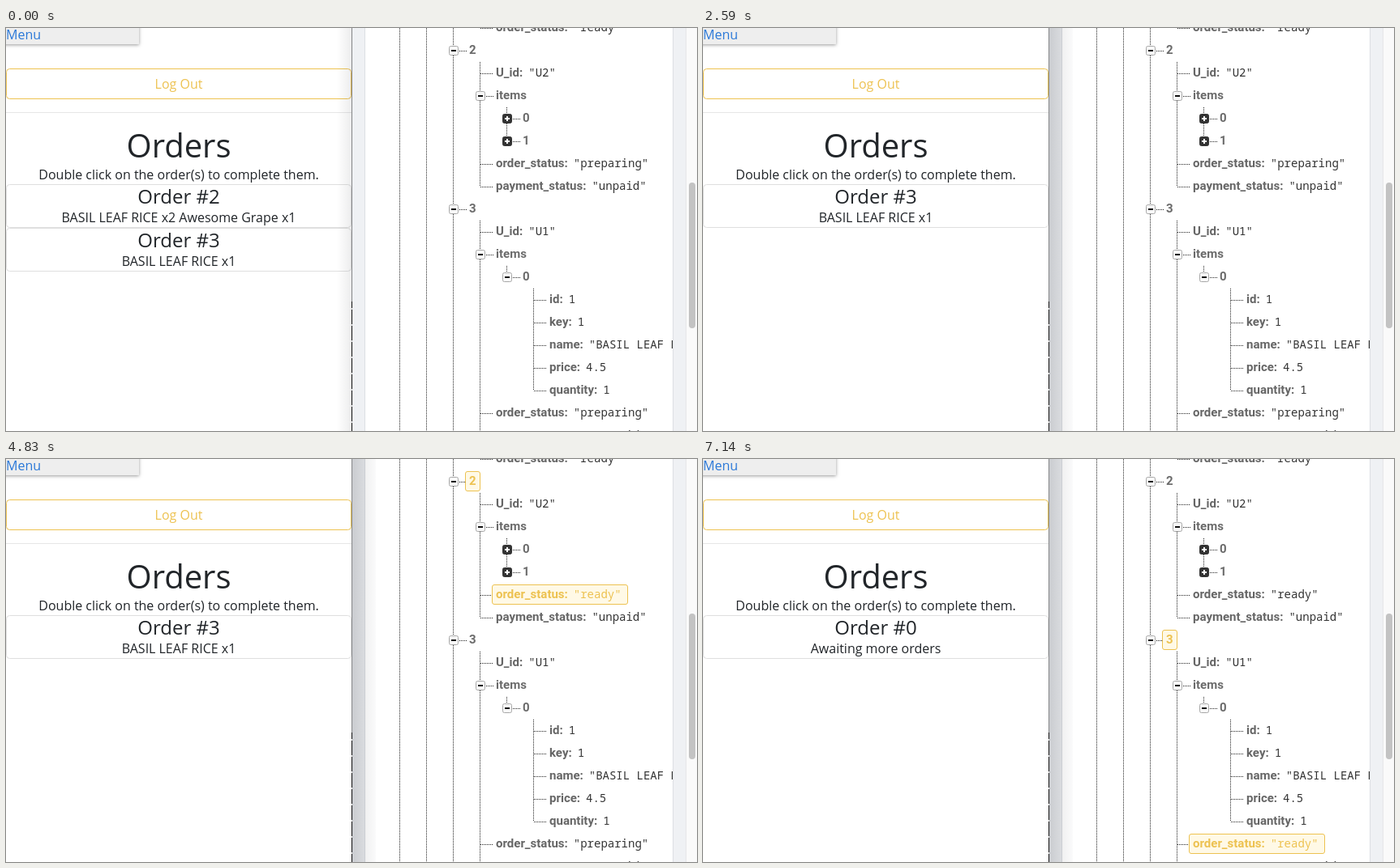
An HTML page with a canvas for the animation above (7280 ms loop, 852x498 px).

```html
<!DOCTYPE html>
<html lang="en">
<head>
<meta charset="utf-8">
<title>Orders</title>
<style>
html, body { margin: 0; width: 100%; height: 100%; overflow: hidden; background: #fff; }
canvas { display: block; }
</style>
</head>
<body>
<canvas id="stage" width="852" height="498"></canvas>
<script>
const ctx = document.getElementById('stage').getContext('2d');
const LOOP = 7280, W = 852, H = 498, SPLIT = 427;
const SANS = '"Open Sans", sans-serif';
const KEY = 'bold 15px Roboto, sans-serif';
const MONO = '14px "Roboto Mono", "Noto Sans Mono", monospace';
const GOLD = '#edc251';

// Moments of the hard changes, in ms
const FOCUS = 1610;
const DONE_2 = 2590, SAVED_2 = 2940, CALM_2 = 4970;
const DONE_3 = 5180, SAVED_3 = 5530;

function rect(x, y, w, h, color) {
  ctx.fillStyle = color;
  ctx.fillRect(x, y, w, h);
}

function text(str, x, y, font, color, align = 'left') {
  ctx.font = font;
  ctx.fillStyle = color;
  ctx.textAlign = align;
  ctx.fillText(str, x, y);
}

function frame(x, y, w, h, r, stroke, fill) {
  ctx.beginPath();
  ctx.roundRect(x + 0.5, y + 0.5, w - 1, h - 1, r);
  if (fill) { ctx.fillStyle = fill; ctx.fill(); }
  ctx.strokeStyle = stroke;
  ctx.lineWidth = 1;
  ctx.stroke();
}

function shade(x0, x1, stops) {
  const g = ctx.createLinearGradient(x0, 0, x1, 0);
  stops.forEach(([at, alpha]) => g.addColorStop(at, `rgba(20,22,30,${alpha})`));
  rect(Math.min(x0, x1), 0, Math.abs(x1 - x0), H, g);
}

function dots(x0, y0, x1, y1) {
  ctx.beginPath();
  ctx.setLineDash([1, 1]);
  const dx = y0 === y1 ? 0 : 0.5, dy = 0.5 - dx;
  ctx.moveTo(x0 + dx, y0 + dy);
  ctx.lineTo(x1 + dx, y1 + dy);
  ctx.strokeStyle = '#222';
  ctx.lineWidth = 1;
  ctx.stroke();
  ctx.setLineDash([]);
}

// ---- Left window: order list ----

function card(y, title, detail) {
  frame(0, y, 426, 54, 4, '#dfdfdf', '#fff');
  text(title, 213, y + 24, '24px ' + SANS, '#212529', 'center');
  text(detail, 213, y + 47, '16px ' + SANS, '#212529', 'center');
}

function drawOrders(t) {
  rect(0, 0, SPLIT, H, '#fff');

  ctx.save();
  ctx.shadowColor = 'rgba(0,0,0,.4)';
  ctx.shadowBlur = 4;
  ctx.shadowOffsetY = 1;
  rect(-5, -10, 169, 30, '#eee');
  ctx.restore();
  text('Menu', 0, 14, '16px ' + SANS, '#2a78d8');

  frame(0, 50, 426, 38, 4, GOLD);
  text('Log Out', 213, 75, '16px ' + SANS, GOLD, 'center');
  rect(0, 104, 426, 1, '#e6e6e6');

  text('Orders', 213, 160, '40px ' + SANS, '#212529', 'center');
  text('Double click on the order(s) to complete them.', 213, 187,
    '16px ' + SANS, '#212529', 'center');

  const rice = 'BASIL LEAF RICE x1';
  if (t < DONE_2) {
    card(193, 'Order #2', 'BASIL LEAF RICE x2 Awesome Grape x1');
    card(247, 'Order #3', rice);
  } else if (t < DONE_3) {
    card(193, 'Order #3', rice);
  } else {
    card(193, 'Order #0', 'Awaiting more orders');
  }

  if (t < FOCUS) shade(408, 426, [[0, 0], [1, 0.08]]);
}

function drawEdge() {
  rect(426, 0, 1, H, '#858688');
  rect(426, 338, 1, H - 338, '#111');
  for (let y = 346; y < H; y += 20) rect(426, y, 1, 2, '#ccc');
}

// ---- Right window: data tree ----

function mark(x, y, w) {
  frame(x, y - 12, w, 25, 2.5, GOLD, '#fff9e6');
}

function toggle(x, y, open) {
  if (open) {
    frame(x - 6, y - 5, 12, 12, 2, '#a8a8a8', '#f7f7f7');
  } else {
    frame(x - 6, y - 5, 12, 12, 2, '#333', '#333');
    rect(x - 1, y - 2, 2, 6, '#fff');
  }
  rect(x - 3, y, 6, 2, open ? '#111' : '#fff');
}

function node(x, y, name, open = true, hot = false) {
  dots(x + 7, y + 1, x + 16, y + 1);
  toggle(x, y, open);
  if (hot) mark(x + 14, y, 19);
  text(name, x + 19, y + 5, KEY, hot ? GOLD : '#6b6b6b');
}

function leaf(x, y, name, value, hot = false) {
  dots(x, y + 1, x + 15, y + 1);
  if (hot) mark(x + 14, y, 168);
  const left = x + 19;
  text(name + ':', left, y + 5, KEY, hot ? GOLD : '#666');
  const end = left + ctx.measureText(name + ':').width;
  text(value, end + 7, y + 5, MONO, hot ? GOLD : '#333');
}

function drawTree(t) {
  rect(SPLIT, 0, W - SPLIT, H, '#eff1f4');
  rect(443, 0, 380, H, '#fff');
  rect(442, 0, 1, H, '#dcdfe3');
  rect(822, 0, 1, H, '#dcdfe3');
  rect(838, 0, 14, H, '#fafafa');
  rect(838, 0, 1, H, '#e5e6e8');
  ctx.beginPath();
  ctx.roundRect(842, 191, 8, 180, 4);
  ctx.fillStyle = '#c3c3c3';
  ctx.fill();

  ctx.save();
  ctx.beginPath();
  ctx.rect(443, 0, 379, H);
  ctx.clip();

  [485, 518, 551].forEach(x => dots(x, 0, x, H));
  dots(584, 42, 584, 196);
  dots(584, 238, 584, H);
  dots(617, 98, 617, 140);
  dots(617, 294, 617, 308);
  dots(650, 322, 650, 448);

  const hot2 = t >= SAVED_2 && t < CALM_2, hot3 = t >= SAVED_3;
  const status = saved => t >= saved ? '"ready"' : '"preparing"';

  leaf(585, -1, 'order_status', '"ready"');

  node(552, 27, '2', true, hot2);
  leaf(585, 55, 'U_id', '"U2"');
  node(585, 83, 'items');
  node(618, 111, '0', false);
  node(618, 139, '1', false);
  leaf(585, 167, 'order_status', status(SAVED_2), hot2);
  leaf(585, 195, 'payment_status', '"unpaid"');

  node(552, 223, '3', true, hot3);
  leaf(585, 251, 'U_id', '"U1"');
  node(585, 279, 'items');
  node(618, 307, '0');
  [['id', '1'], ['key', '1'], ['name', '"BASIL LEAF RICE"'], ['price', '4.5'], ['quantity', '1']]
    .forEach(([name, value], i) => leaf(651, 335 + 28 * i, name, value));
  leaf(585, 475, 'order_status', status(SAVED_3), hot3);
  leaf(585, 503, 'payment_status', '"unpaid"');
  ctx.restore();

  if (t >= FOCUS) shade(SPLIT, 456, [[0, 0.17], [0.5, 0.1], [0.58, 0.06], [1, 0.02]]);
}

const start = performance.now();

function draw() {
  const t = Math.max(0, performance.now() - start) % LOOP;
  drawTree(t);
  drawOrders(t);
  drawEdge();
  requestAnimationFrame(draw);
}
draw();
</script>
</body>
</html>
```
